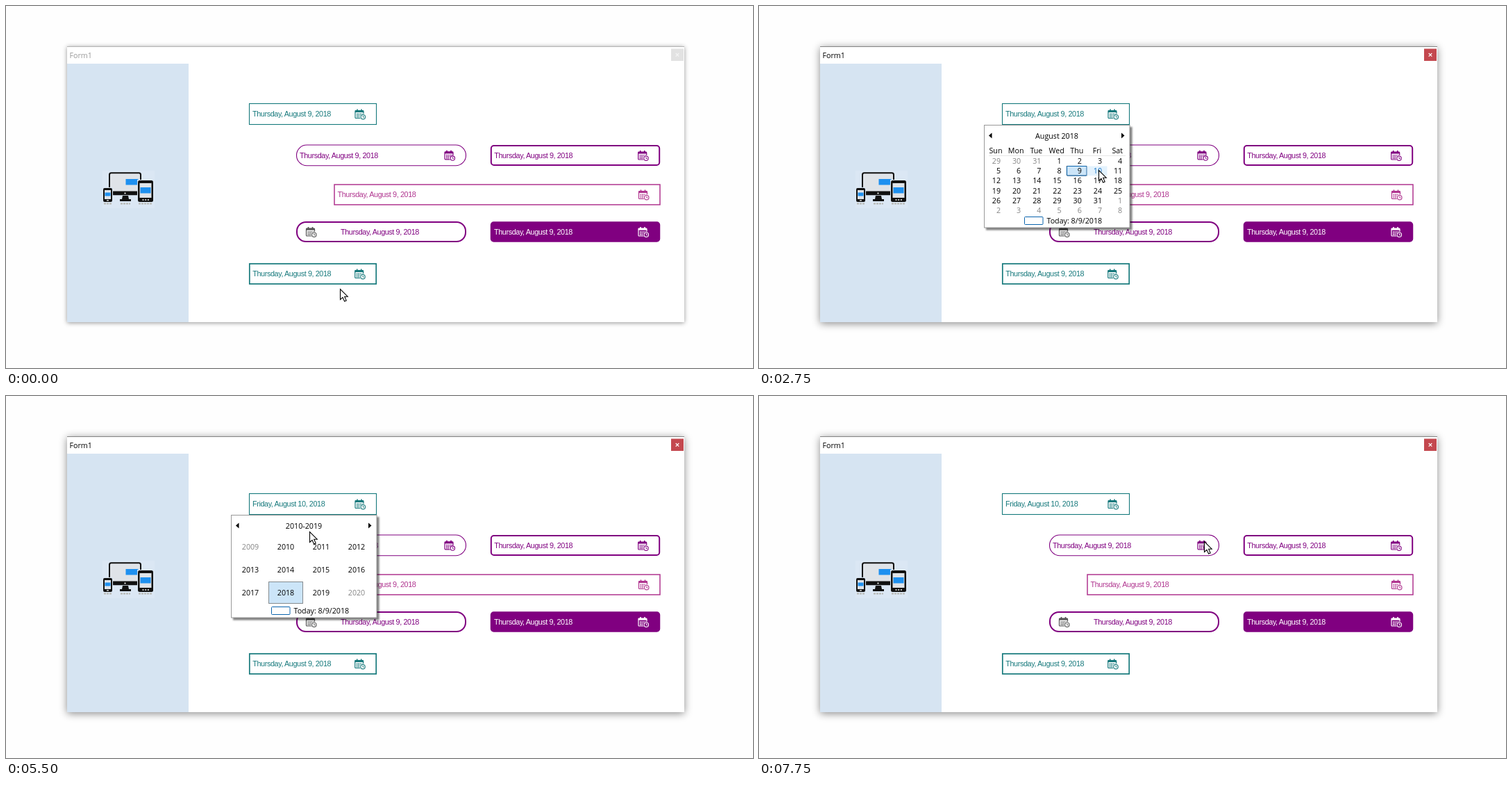
These frames come from a looping animation (1076 by 521 pixels, 8 s). An HTML page:

```html
<!DOCTYPE html>
<html lang="en">
<head>
<meta charset="utf-8">
<title>Date pickers</title>
<style>
html, body { margin: 0; height: 100%; overflow: hidden; background: #fefefe; }
svg { display: block; }
text { font: 10.7px "Open Sans", "Noto Sans", sans-serif; }
.date { font: 10.8px "Liberation Sans", Arial, sans-serif; letter-spacing: -.39px; }
.mid { text-anchor: middle; }
.end { text-anchor: end; }
.frame { fill: #fff; filter: drop-shadow(0 1px 3px rgba(0,0,0,.42)); }
.active .frame { filter: drop-shadow(0 2px 6px rgba(0,0,0,.46)); }
.edge { stroke: #b5b5b5; }
.active .edge { stroke: #858585; }
.title { fill: #999; }
.active .title { fill: #000; }
.close { fill: #e2e2e2; }
.active .close { fill: #c4484f; }
.cross { stroke: #f4f4f4; stroke-width: 1.2; }
.active .cross { stroke: #fff; }
</style>
</head>
<body>
<svg id="stage" width="1076" height="521" viewBox="0 0 1076 521"></svg>
<script>
const STEP = 250, STEPS = 32;
const TEAL = '#16797c', PURPLE = '#800080', PINK = '#b0358f', BLUE = '#0a64ad', PALE = '#cce5f8';
const stage = document.getElementById('stage');

// step, cursor x, cursor y, calendar view
const keys = [
  [0, 481, 407, ''], [1, 484, 409, ''], [2, 477, 330, ''], [3, 451, 205, ''],
  [4, 424, 109, ''], [5, 425, 126, ''], [6, 432, 169, ''], [7, 505, 158, ''],
  [8, 509, 157, 'days'], [9, 507, 187, 'days'], [10, 500, 229, 'days'], [11, 489, 236, 'days'],
  [13, 489, 236, ''], [14, 503, 180, ''], [15, 508, 157, 'days'], [16, 462, 154, 'days'],
  [17, 438, 185, 'days'], [18, 434, 188, 'months'], [19, 434, 190, 'months'],
  [20, 435, 191, 'months'], [21, 436, 193, 'years'], [22, 437, 195, 'years'],
  [23, 525, 202, 'years'], [24, 634, 211, ''], [25, 641, 208, ''], [26, 641, 208, 'second'],
  [27, 641, 209, 'second'], [29, 641, 209, '']
];

const text = (s, x, y, fill = '#000', cls = '') =>
  `<text x="${x}" y="${y}" fill="${fill}" class="${cls}">${s}</text>`;
const rect = (x, y, w, h, fill, more = '') =>
  `<rect x="${x}" y="${y}" width="${w}" height="${h}" fill="${fill}" ${more}/>`;
const path = (d, fill, more = '') => `<path d="${d}" fill="${fill}" ${more}/>`;
const group = (x, y, body) => `<g transform="translate(${x} ${y})">${body}</g>`;

function icon(x, y, color, back) {
  return group(x, y,
    rect(1, 2.5, 12, 11, 'none', `stroke="${color}" stroke-width="1.2" rx="1"`) +
    rect(1, 2.5, 12, 2.6, color) +
    path('M4 .5V4M10 .5V4', 'none', `stroke="${color}" stroke-width="1.6"`) +
    path('M3 7.3H12M3 9.4H12M3 11.5H12', 'none', `stroke="${color}" stroke-width="1.3" stroke-dasharray="1.7 .8"`) +
    `<circle cx="12.3" cy="11.7" r="4.4" fill="${back}"/>` +
    `<circle cx="12.3" cy="11.7" r="3.2" fill="none" stroke="${color}" stroke-width="1.1"/>` +
    path('M12.3 9.8V12H14', 'none', `stroke="${color}" stroke-width=".9"`));
}

function picker(x, y, w, h, color, line, radius, opt = {}) {
  const { fill = '#fff', ink = color, iconInk = ink, iconX = x + w - 31.5, textX = x + 4.5, id = '' } = opt;
  return rect(x, y, w, h, fill, `stroke="${color}" stroke-width="${line}" rx="${radius}"`) +
    `<text class="date" id="${id}" x="${textX}" y="${y + h / 2 + 3.8}" fill="${ink}">Thursday, August 9, 2018</text>` +
    icon(iconX, y + h / 2 - 7.5, iconInk, fill);
}

function devices() {
  const glass = '#dfe3e8', sky = '#1e90f0';
  return rect(139, 237, 75, 54, '#dbe7f4') +
    rect(149, 240.3, 45, 31, glass, 'stroke="#111" stroke-width="2" rx="2.5"') +
    rect(149, 266.5, 45, 5.5, '#111') +
    `<circle cx="171.5" cy="269.5" r="1.1" fill="#fff"/>` +
    path('M168 273H176L177 278H180V281H164V278H167Z', '#111') +
    rect(172.5, 249, 18, 8.5, sky) +
    rect(139, 261, 15, 22, '#dbe7f4') +
    rect(140, 262, 13, 20, '#111', 'rx="2"') +
    rect(142, 265, 9, 13, glass) + rect(142.5, 268.5, 8, 5, sky) +
    rect(145, 279.3, 3, 1.2, '#fff') +
    rect(189, 250, 24, 33, '#dbe7f4') +
    rect(190, 251, 22, 31, '#111', 'rx="2.5"') +
    rect(192.5, 255, 17, 21, glass) + rect(193.5, 261, 15, 8.5, sky) +
    path('M196.5 279H206', 'none', 'stroke="#fff" stroke-width="1.6" stroke-dasharray="2 1.7"') +
    path('M141 284.5H152M165 284.5H179M191 284.5H211', 'none',
      'stroke="#b5b5b0" stroke-width="2" stroke-dasharray="3 1"');
}

function days(selected, hover) {
  const names = ['Sun', 'Mon', 'Tue', 'Wed', 'Thu', 'Fri', 'Sat'];
  let out = path('M331 215.5H528', 'none', 'stroke="#e6e6e6"') + text('August 2018', 429, 191, '#000', 'mid');
  names.forEach((n, i) => out += text(n, 341 + i * 29.2, 212, '#000', 'mid'));
  for (let i = 0; i < 42; i++) {
    const n = i - 2, col = i % 7, row = i / 7 | 0;
    const x = 326.5 + col * 29.2, y = 216.3 + row * 14.2;
    const inside = n > 0 && n < 32, today = n === 9;
    if (n === selected) out += rect(x, y, 29, 13.6, PALE, 'stroke="#222" stroke-dasharray="1 1"');
    else if (n === hover) out += rect(x, y, 29, 13.6, '#e3f2fd');
    if (today) out += rect(x + .2, y, 28.6, 13.6, 'none', `stroke="${BLUE}" rx="1"`);
    const ink = !inside ? '#858585' : n === hover || today && n !== selected ? '#1874c4' : '#000';
    out += text(n < 1 ? n + 31 : n > 31 ? n - 31 : n, 348 + col * 29.2, 227 + row * 14.2, ink, 'end');
  }
  return out;
}

function cells(title, labels, selected, faded = []) {
  let out = text(title, 429, 191, '#000', 'mid');
  labels.forEach((s, i) => {
    const x = 352 + i % 4 * 51, y = 217 + (i / 4 | 0) * 33;
    if (i === selected) out += rect(x - 24.5, y - 15.5, 49, 31, PALE, 'stroke="#222" stroke-dasharray="1 1"');
    out += text(s, x, y + 4, faded.includes(i) ? '#858585' : '#000', 'mid');
  });
  return out;
}

const months = 'Jan Feb Mar Apr May Jun Jul Aug Sep Oct Nov Dec'.split(' ');
const years = Array.from({ length: 12 }, (_, i) => 2009 + i);

function calendar(view, step) {
  if (!view) return '';
  const body = view === 'months' ? cells('2018', months, 7)
    : view === 'years' ? cells('2010-2019', years, 9, [0, 11])
    : days(view === 'days' && step > 12 ? 10 : 9, step === 10 || step === 11 || step === 12 ? 10 : 0);
  const shift = view === 'second' ? [129, 60] : [0, 0];
  return group(...shift,
    rect(324.5, 171.5, 209.5, 147.5, '#fff', 'stroke="#999" style="filter:drop-shadow(3px 3px 1.2px rgba(0,0,0,.5))"') +
    path('M335.5 182.5V190.5L331 186.5ZM522 182.5V190.5L526.5 186.5Z', '#000') + body +
    rect(382.5, 303.5, 26.5, 11, '#fff', `stroke="${BLUE}" rx="1"`) +
    text('Today: 8/9/2018', 414.5, 313));
}

stage.innerHTML =
  rect(88, 58, 889, 397, '#fff', 'class="frame"') +
  path('M88 58.5H977', 'none', 'class="edge"') +
  text('Form1', 91.5, 74.5, '', 'title') +
  rect(958, 61.5, 18, 17.5, '', 'class="close"') +
  path('M964.7 68L969.3 72.6M969.3 68L964.7 72.6', 'none', 'class="cross"') +
  rect(88, 83, 175, 372, '#d6e4f2') +
  devices() +
  picker(350.5, 140.5, 183, 30, TEAL, 1.1, 0, { id: 'first' }) +
  picker(418.5, 200, 244, 29.7, PURPLE, 1.1, 14.8) +
  picker(698.8, 201, 242.4, 28, PURPLE, 2, 4) +
  picker(473, 257, 469, 29, PINK, 1.5, 0) +
  picker(419, 311, 243, 28, PURPLE, 2, 13, { iconInk: '#555', iconX: 431.5, textX: 482 }) +
  picker(698.5, 311, 243, 28, PURPLE, 1.5, 4, { fill: PURPLE, ink: '#fff' }) +
  picker(350.8, 371, 182.4, 29, TEAL, 1.7, 0) +
  '<g id="popup"></g>' +
  '<g id="cursor">' +
  path('M.5.5V15.5L4 12.3L6.6 18L9.2 16.9L6.7 11.2H11.2Z', '#fff', 'stroke="#000" stroke-width="1.1"') + '</g>';

const popup = document.getElementById('popup');
const cursor = document.getElementById('cursor');
const first = document.getElementById('first');
let shown = -1;

function draw(step) {
  const [, x, y, view] = keys.filter(k => k[0] <= step).pop();
  stage.classList.toggle('active', step >= 8);
  first.textContent = step < 13 ? 'Thursday, August 9, 2018' : 'Friday, August 10, 2018';
  popup.innerHTML = calendar(view, step);
  cursor.setAttribute('transform', `translate(${x} ${y})`);
}

function tick() {
  const step = Math.floor(performance.now() / STEP) % STEPS;
  if (step !== shown) draw(shown = step);
  requestAnimationFrame(tick);
}
tick();
</script>
</body>
</html>
```
